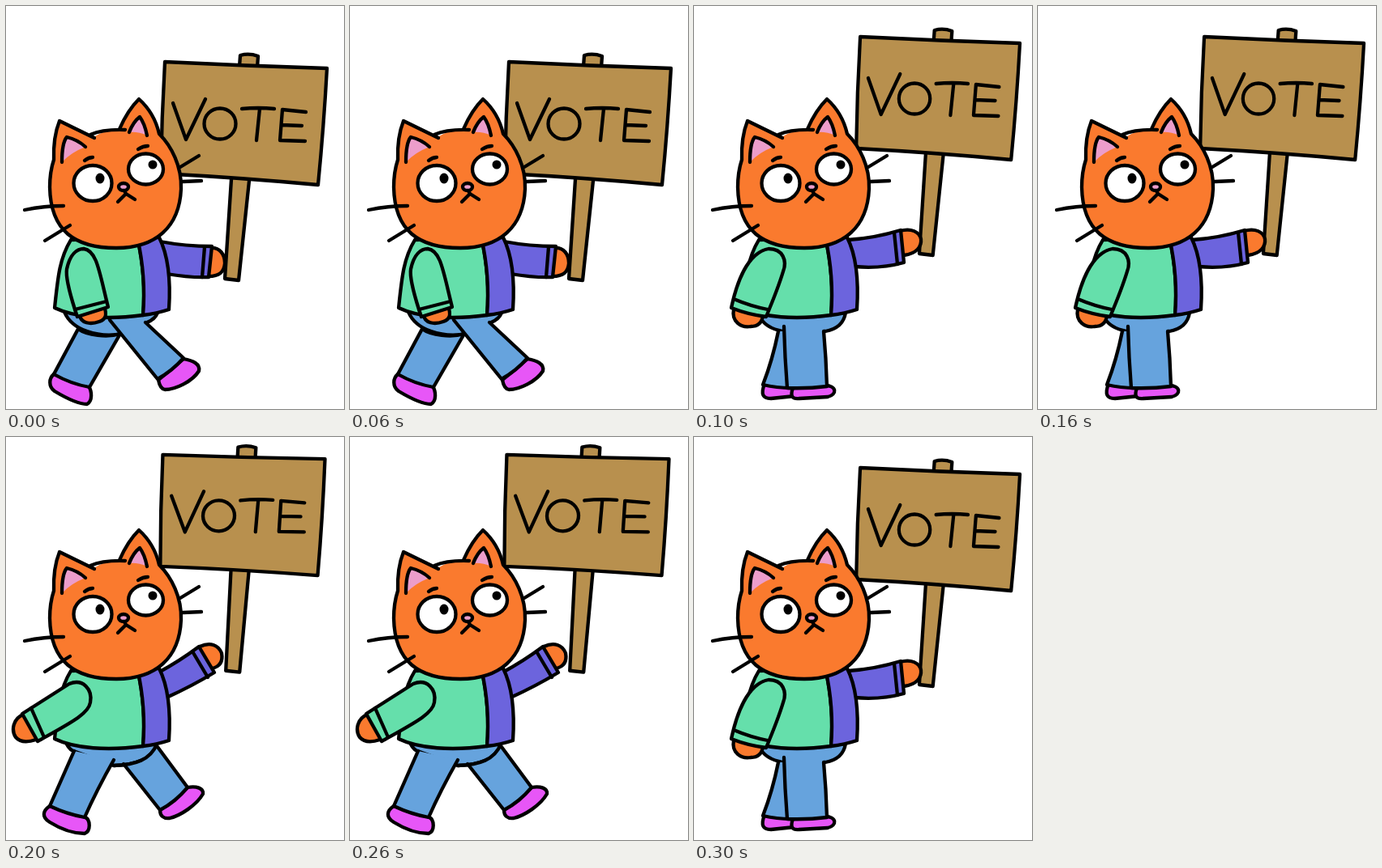
An HTML page that plays this animation: 417x498 px, repeating every 0.4 s.

```html
<!DOCTYPE html>
<html lang="en">
<head>
<meta charset="utf-8">
<title>Marching cat</title>
<style>
  html, body { margin: 0; width: 100%; height: 100%; overflow: hidden; background: #fff; }
  svg { display: block; fill: none; stroke: #000; stroke-width: 4.3; stroke-linecap: round; stroke-linejoin: round; }
  .wood { fill: #b8904e; }
  .fur { fill: #fa7a2e; }
  .green { fill: #65dfab; }
  .purple { fill: #6c64dd; }
  .denim { fill: #66a3dd; }
  .shoe { fill: #e756f7; }
  .pink { fill: #ec9dcb; }
  .white { fill: #fff; }
  .ink { fill: #000; stroke: none; }
  .bare { stroke: none; }
</style>
</head>
<body>
<svg width="417" height="498" viewBox="0 0 417 498">
  <g id="sign">
    <path class="wood" d="M289 61Q300 58 311 62L300 216L287 339L270 337L278 214Z"/>
    <path class="wood" d="M196 69Q296 74 396 77Q392 150 385 221Q288 212 191 207Q192 138 196 69Z"/>
    <path d="M206 120L222 165L246 115M291 127Q311 125 331 127M313 127L309 166M370 131L341 128L338 166L369 167M340 147L365 148"/>
    <ellipse cx="264" cy="145.500" rx="19.500" ry="19"/>
  </g>

  <path id="frontHand" class="fur"/>
  <path id="frontSleeve" class="purple"/>
  <path id="frontCuff"/>

  <path id="hips" class="denim"/>
  <path id="backShoe" class="shoe"/>
  <path id="backLeg" class="denim"/>
  <path id="frontShoe" class="shoe"/>
  <path id="frontLegFill" class="denim bare"/>
  <path id="frontLeg"/>

  <path class="green" d="M80 289C66 312 64 335 60 373C85 385 125 388 169 382Q173 335 162 286Z"/>
  <path class="purple" d="M162 286Q173 335 169 382Q186 380 201 375C203 345 201 310 189 286Z"/>

  <path id="backHand" class="fur"/>
  <path id="backSleeve" class="green"/>
  <path id="backCuff"/>

  <g id="head">
    <path class="fur bare" d="M59 190Q58 162 66 142L108 162Q122 153 140 152Q150 129 164 115Q183 132 189 158C204 173 217 198 216 226C214 273 185 299 136 299C85 299 55 278 54 224Q54 205 59 190Z"/>
    <path class="pink bare" d="M69 193Q69 169 75 162Q88 165 98 174Q80 181 69 193ZM152 156Q157 143 165 137Q171 145 174 160Q163 155 152 156Z"/>
    <path d="M69 193Q69 169 75 162Q88 165 98 174M152 156Q157 143 165 137Q171 145 174 160"/>
    <path d="M109 163L66 142Q58 162 59 190Q54 205 54 224C55 278 85 299 136 299C185 299 214 273 216 226C217 198 204 173 189 158Q183 132 164 115Q150 129 140 152M104 159Q120 152 147 153"/>
    <path d="M97 191Q102 187 107 187M163 177Q169 173 175 173"/>
    <ellipse class="white" cx="107" cy="219" rx="23.500" ry="22"/>
    <ellipse class="white" cx="172.500" cy="201.500" rx="21.500" ry="19"/>
    <ellipse class="ink" cx="116" cy="213" rx="5.500" ry="6.500"/>
    <circle class="ink" cx="181" cy="196" r="5.500"/>
    <path d="M138 242L148 232L159 239M146 228L148 232"/>
    <ellipse class="pink" cx="145" cy="223.500" rx="6" ry="4.500"/>
    <path d="M23 252Q47 247 71 247M48 290L79 271M215 199L238 185M218 217L241 216"/>
  </g>
</svg>
<script>
const STEP = 100;

const stepBack = {
  frontHand: "M252 299C264 298 270 307 270 318C269 330 262 334 250 334",
  frontSleeve: "M190 291Q222 297 254 297L250 335Q228 336 198 331Z",
  frontCuff: "M245 298L242 335",
  hips: "M72 378C82 402 115 409 138 406L174 391Q184 387 187 379Z",
  backShoe: "M59 455C53 460 52 470 60 476C75 485 90 492 100 492C107 488 106 476 102 470Z",
  backLeg: "M89 399L59 455Q80 467 103 471L141 405C125 410 100 407 89 399Z",
  frontShoe: "M188 462Q190 473 196 474C209 474 230 464 238 451C240 442 230 438 219 436Z",
  frontLegFill: "M128 386L187 461Q205 451 219 435L172 390Z",
  frontLeg: "M128 388L187 461Q205 451 219 435L172 391",
  backHand: "M91 382C92 392 104 394 115 390C124 387 124 381 122 374",
  backSleeve: "M88 384L85 375Q73 337 75 325C79 306 88 300 96 300C112 302 115 328 126 372Z",
  backCuff: "M85 375L124 365"
};

const passing = {
  frontHand: "M254 278C268 274 278 279 280 288C281 297 275 306 259 308",
  frontSleeve: "M190 289Q222 287 255 277L259 317Q230 325 198 322Z",
  frontCuff: "M247 280L251 319",
  hips: "M80 382Q87 398 110 402L162 402Q184 398 187 379Z",
  backShoe: "M87 467C82 480 85 485 95 485L124 482L122 472Z",
  backLeg: "M104 402Q97 437 85 468Q102 472 120 472L118 402",
  frontShoe: "M122 472C118 483 122 486 130 485L165 483C177 480 176 469 162 469Z",
  frontLegFill: "M111 394L115 472L164 470L160 394Z",
  frontLeg: "M111 396Q112 434 115 472Q140 473 164 470Q163 435 160 402",
  backHand: "M49 375C46 390 58 398 70 396C80 396 84 390 85 383",
  backSleeve: "M46 373C52 345 65 305 92 300C110 300 115 315 110 328Q104 348 89 384Q66 381 46 373Z",
  backCuff: "M49 362Q70 371 91 375"
};

const stepFront = {
  frontHand: "M239 259C252 253 262 257 266 267C268 278 263 284 254 286",
  frontSleeve: "M188 291Q214 277 238 259L257 291Q229 308 198 322Z",
  frontCuff: "M230 265L249 297",
  hips: "M74 378Q79 388 86 389L133 406C160 405 178 399 186 380Z",
  backShoe: "M54 456C45 462 44 470 54 476C70 486 85 490 97 490C105 487 104 473 98 470Z",
  backLeg: "M84 388L54 456Q75 466 97 470Q112 436 133 399",
  frontShoe: "M190 461C190 468 194 472 202 471C215 468 235 455 243 441C244 434 235 431 224 433Z",
  frontLegFill: "M145 404L190 461Q209 451 224 433L186 382Q174 401 145 404Z",
  frontLeg: "M145 404L190 461Q209 451 224 433L187 383M133 406C160 405 178 399 186 380",
  backHand: "M21 343C9 348 6 362 12 371C18 378 28 377 37 374",
  backSleeve: "M20 342L78 305C95 298 107 312 104 328C102 342 80 353 39 376Z",
  backCuff: "M31 335L47 371"
};

const low = "translate(0 0)";
const middle = "matrix(.985 0 0 1 12 -31)";
const high = "translate(-1.5 -48.5) rotate(-.8 290 145)";

const walk = [
  { pose: stepBack, sign: low },
  { pose: passing, sign: middle },
  { pose: stepFront, sign: high },
  { pose: passing, sign: middle }
];
const part = id => document.getElementById(id);
let shown = -1;

function draw() {
  const index = Math.floor(performance.now() / STEP) % walk.length;
  if (index !== shown) {
    shown = index;
    const { pose, sign } = walk[index];
    for (const [id, d] of Object.entries(pose)) part(id).setAttribute("d", d);
    part("sign").setAttribute("transform", sign);
  }
  requestAnimationFrame(draw);
}
draw();
</script>
</body>
</html>
```
